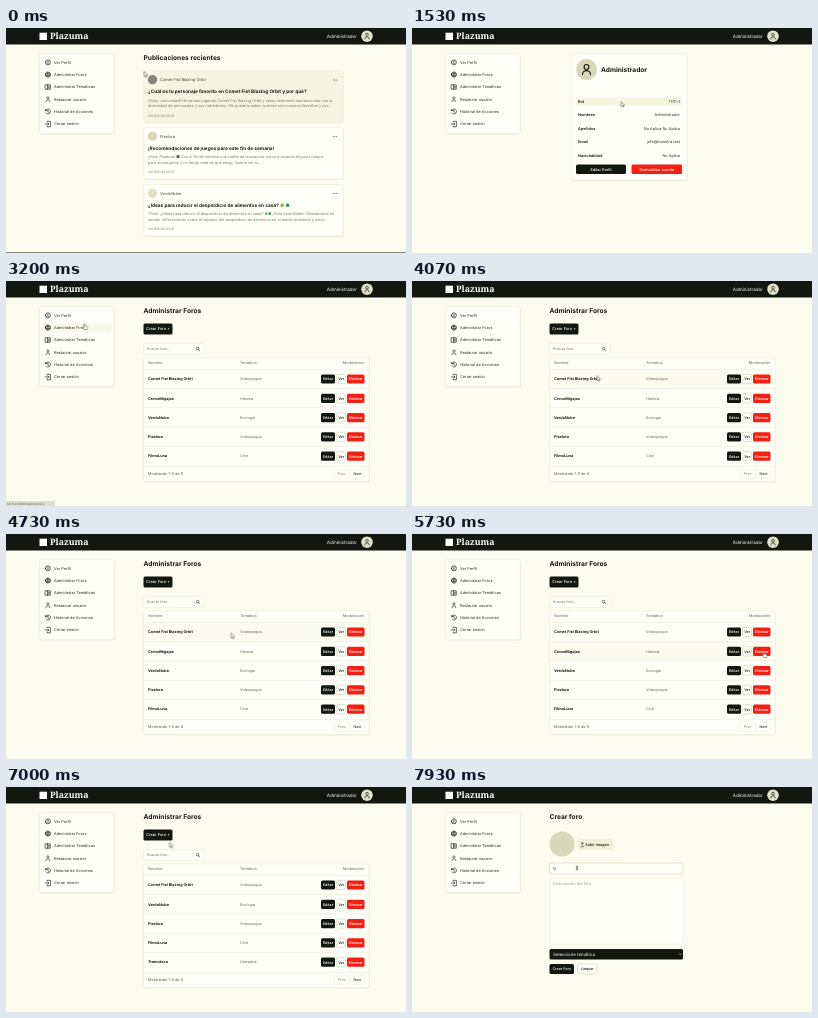
An HTML page for the animation above (8 s loop, 400 by 225 pixels).

```html
<!DOCTYPE html>
<html lang="es">
<head>
<meta charset="utf-8">
<title>Foro</title>
<style>
  html, body { margin: 0; width: 100%; height: 100%; overflow: hidden; background: #fdfdef; }
  svg { display: block; width: 100%; height: 100%; }
  text { font-family: Inter, "Open Sans", sans-serif; white-space: pre; text-rendering: geometricPrecision; }
  .brand { font-family: "Noto Serif", serif; }
</style>
</head>
<body>
<svg id="stage" viewBox="0 0 400 225" preserveAspectRatio="none"></svg>
<script>
const LOOP = 8000;
const INK = '#12170f', TEXT = '#17190f', SOFT = '#7b7b66', LINE = '#e9e9d2';
const PAPER = '#fffffa', PALE = '#f3f3da', HOVER = '#f5f5e1', SAND = '#d9d9b9';
const RED = '#f22012', DEEP_RED = '#bb1a0b';
const stage = document.getElementById('stage');

function add(parent, tag, attrs = {}, content) {
  const el = document.createElementNS('http://www.w3.org/2000/svg', tag);
  for (const key in attrs) el.setAttribute(key, attrs[key]);
  if (content !== undefined) el.textContent = content;
  parent.append(el);
  return el;
}
const group = (parent = stage) => add(parent, 'g');
const rect = (p, x, y, x2, y2, fill, rx = 0, stroke = 'none') =>
  add(p, 'rect', { x, y, width: x2 - x, height: y2 - y, fill, rx, stroke, 'stroke-width': .5 });
const circle = (p, cx, cy, r, fill) => add(p, 'circle', { cx, cy, r, fill });
const path = (p, d, stroke = TEXT, width = .65, fill = 'none') =>
  add(p, 'path', { d, stroke, fill, 'stroke-width': width, 'stroke-linecap': 'round', 'stroke-linejoin': 'round' });
const text = (p, x, y, str, size = 3.8, weight = 400, fill = TEXT, anchor = 'start') =>
  add(p, 'text', { x, y, 'font-size': size, 'font-weight': weight, fill, 'text-anchor': anchor }, str);

// Text whose symbols ◆ ● ○ become small coloured marks.
const MARKS = { '◆': ['■', '#54505c'], '●': ['●', '#7fb62c'], '○': ['●', '#2f9362'] };
function markedText(p, x, y, str, ...style) {
  const el = text(p, x, y, '', ...style);
  for (const part of str.split(/([◆●○])/)) {
    const [content, fill] = MARKS[part] || [part];
    add(el, 'tspan', fill ? { fill } : {}, content);
  }
}

function button(p, x, y, x2, y2, label, fill, color = '#fff', size = 3.5, weight = 500) {
  const pale = fill === PAPER || fill === PALE;
  rect(p, x, y, x2, y2, fill, 1.5, pale ? '#c4c4a0' : 'none');
  text(p, (x + x2) / 2, (y + y2) / 2 + size * .36, label, size, weight, color, 'middle');
}
function panel(p, x, y, x2, y2) {
  rect(p, x + .3, y + .8, x2 + .6, y2 + 1, '#eeeed9', 2);
  return rect(p, x, y, x2, y2, PAPER, 2, LINE);
}
function person(p, x, y, s) {
  add(p, 'circle', { cx: x, cy: y - .25 * s, r: .23 * s, fill: 'none', stroke: TEXT, 'stroke-width': .11 * s });
  path(p, `M${x - .38 * s} ${y + .48 * s}a${.38 * s} ${.38 * s} 0 0 1 ${.76 * s} 0`, TEXT, .11 * s);
}

// Visible only inside the given [from, to] spans.
function show(el, ...spans) {
  const frames = [{ offset: 0, opacity: 0 }];
  for (const [from, to] of spans) {
    if (from === 0) frames[0].opacity = 1;
    else frames.push({ offset: from / LOOP, opacity: 1 });
    if (to < LOOP) frames.push({ offset: to / LOOP, opacity: 0 });
  }
  frames.push({ offset: 1, opacity: frames.at(-1).opacity });
  for (const f of frames) f.easing = 'step-end';
  el.animate(frames, { duration: LOOP, iterations: Infinity });
  return el;
}

function drawHome(p) {
  text(p, 137.5, 32.4, 'Publicaciones recientes', 6.6, 700);
  const posts = [
    { y: 43, color: '#85857c', forum: 'Comet Fist Blazing Orbit',
      title: '¿Cuál es tu personaje favorito en Comet Fist Blazing Orbit y por qué?',
      body: ['¡Hola, comunidad! He estado jugando Comet Fist Blazing Orbit y estoy realmente impresionado con la',
             'diversidad de personajes y sus habilidades. Me gustaría saber quiénes son vuestros favoritos y por...'] },
    { y: 99.5, color: SAND, forum: 'Pixelura',
      title: '¡Recomendaciones de juegos para este fin de semana!',
      body: ['¡Hola, Pixelura! ◆ Con el fin de semana a la vuelta de la esquina, estoy buscando algunos juegos',
             'para sumergirme y no tengo idea de qué elegir. Quería ver si...'] },
    { y: 156.5, color: '#e1e1c2', forum: 'VerdoNube',
      title: '¿Ideas para reducir el desperdicio de alimentos en casa? ● ○',
      body: ['Título: ¿Ideas para reducir el desperdicio de alimentos en casa? ●○ ¡Hola VerdoNube! Últimamente he',
             'estado reflexionando sobre el impacto del desperdicio de alimentos en el medio ambiente y estoy...'] }
  ];
  posts.forEach(({ y, color, forum, title, body }, i) => {
    panel(p, 138, y, 337, y + 51.5);
    if (!i) show(rect(p, 138, y, 337, y + 51.5, HOVER, 2), [0, 140]);
    circle(p, 146.5, y + 8.8, 4.7, color);
    text(p, 154, y + 10.1, forum, 4, 400, '#45452f');
    for (const x of [327.4, 329, 330.6]) circle(p, x, y + 9, .45, TEXT);
    markedText(p, 142, y + 22.2, title, 4.75, 700);
    body.forEach((line, k) => markedText(p, 142, y + 30.8 + k * 5.6, line, 3.85, 400, SOFT));
    text(p, 142, y + 45.5, '03/12/2024 05:21', 3.2, 400, SOFT);
  });
  rect(p, 0, 224, 400, 225, '#898978');
}

function drawProfile(p) {
  panel(p, 160, 25.5, 275, 152);
  circle(p, 174.5, 41.5, 10.5, SAND);
  person(p, 174.5, 41.5, 10.5);
  text(p, 189, 44.2, 'Administrador', 6.6, 700);
  const rows = [['Rut', '11111-1'], ['Nombres', 'Administrador'], ['Apellidos', 'No Aplica No Aplica'],
                ['Email', 'jefe@muestra.test'], ['Nacionalidad', 'No Aplica']];
  const hovers = [[1380, 1800], [1800, 1960], [1960, 2090], [2090, 2220], [2220, 2340]];
  rows.forEach(([label, value], i) => {
    const y = 73.6 + i * 13.5;
    show(rect(p, 163.5, y - 4.5, 270, y + 4.5, HOVER, 1), hovers[i]);
    text(p, 166, y + 1.3, label, 3.85, 600);
    text(p, 268, y + 1.3, value, 3.85, 400, '#303020', 'end');
  });
  button(p, 164, 136.5, 214, 146, 'Editar Perfil', INK, '#fff', 3.8);
  button(p, 219.5, 136.5, 270, 146, 'Deshabilitar cuenta', RED, '#fff', 3.75);
}

function drawForums(p, names, total, hovers) {
  text(p, 137.5, 32.4, 'Administrar Foros', 6.65, 700);
  button(p, 137.5, 42.5, 166.5, 53.5, 'Crear Foro +', INK, '#fff', 4);
  rect(p, 137.5, 62.5, 198, 73.5, PAPER, 1.5, LINE);
  text(p, 141, 69.3, 'Buscar foro...', 3.7, 400, SOFT);
  circle(p, 191.6, 67.6, 1.3, 'none').setAttribute('style', `stroke:${TEXT};stroke-width:.55`);
  path(p, 'M192.6 68.6l1.2 1.2', TEXT, .55);
  panel(p, 137.5, 77, 363, 200.5);
  text(p, 142, 83.4, 'Nombre', 3.8, 500, SOFT);
  text(p, 234, 83.4, 'Temática', 3.8, 500, SOFT);
  text(p, 358.5, 83.4, 'Moderación', 3.8, 500, SOFT, 'end');
  names.forEach(([name, topic], i) => {
    const y = 98 + i * 19.3;
    if (hovers[i]) show(rect(p, 138, y - 9.6, 362.7, y + 9.6, '#fbfbee'), ...hovers[i]);
    rect(p, 137.5, y - 10, 363, y - 9.5, LINE);
    text(p, 142, y + 1.2, name, 3.8, 700);
    text(p, 234, y + 1.2, topic, 3.7, 400, '#65654c');
    button(p, 315, y - 4.6, 329, y + 4.6, 'Editar', INK, '#fff', 3.7);
    button(p, 330.7, y - 4.6, 339.6, y + 4.6, 'Ver', PAPER, TEXT, 3.7);
    button(p, 341, y - 4.6, 358.5, y + 4.6, 'Eliminar', RED, '#fff', 3.7);
  });
  rect(p, 137.5, 185, 363, 185.5, LINE);
  text(p, 142, 194, `Mostrando 1-5 de ${total}`, 3.8, 400, '#58583f');
  rect(p, 328.5, 188, 343, 197.5, PAPER, 1.5, LINE);
  rect(p, 344.5, 188, 358.5, 197.5, PAPER, 1.5, LINE);
  text(p, 335.7, 194, 'Prev', 3.6, 400, SOFT, 'middle');
  text(p, 351.5, 194, 'Next', 3.6, 400, TEXT, 'middle');
}

function drawCreate(p) {
  text(p, 137.5, 32.4, 'Crear foro', 6.65, 700);
  circle(p, 150, 57, 12.6, SAND);
  rect(p, 165.5, 52, 201.5, 63, '#f0f0d6', 1.5);
  path(p, 'M170.3 58.5v-3m-1.2 1.2l1.2-1.2 1.2 1.2m-2.6 3h2.8', TEXT, .5);
  text(p, 173.2, 58.9, 'Subir imagen', 3.8, 500);
  rect(p, 137.5, 76, 271, 87, PAPER, 1.5, '#c4c4a0');
  show(text(p, 141, 83, 'Nombre del foro', 3.9, 400, '#96967c'), [7300, 7870]);
  show(text(p, 141, 83, 'O', 3.9), [7870, LOOP]);
  rect(p, 137.5, 91.5, 271, 157, PAPER, 1.5, LINE);
  text(p, 141, 98, 'Descripción del foro', 4, 400, '#96967c');
  rect(p, 137.5, 162, 271, 172.5, INK, 1.5);
  text(p, 141, 168.7, 'Seleccione temática', 4.4, 400, '#fff');
  path(p, 'M267.2 166.7l1.1 1.1 1.1-1.1', '#fff', .5);
  button(p, 137.5, 177, 162, 187, 'Crear Foro', INK, '#fff', 3.7);
  button(p, 165.5, 177, 185, 187, 'Limpiar', PAPER, TEXT, 3.7);
}

function drawFrame(p) {
  rect(p, 0, 0, 400, 16.5, INK);
  rect(p, 33.5, 4.7, 41, 12, '#fff');
  const brand = text(p, 44, 11.4, 'Plazuma', 8.8, 700, '#fff');
  brand.setAttribute('class', 'brand');
  text(p, 351, 10, 'Administrador', 4.55, 400, '#fff', 'end');
  circle(p, 361, 8.2, 5.8, '#e2e2c8');
  person(p, 361, 8.2, 6);

  panel(p, 33.5, 25.5, 108, 105.5);
  const hovers = { 0: [430, 1000], 1: [2840, 3570] };
  const labels = ['Ver Perfil', 'Administrar Foros', 'Administrar Temáticas',
                  'Restaurar usuario', 'Historial de Acciones', 'Cerrar sesión'];
  labels.forEach((label, i) => {
    const y = 34.3 + i * 12.35;
    if (hovers[i]) show(rect(p, 36, y - 5, 105.5, y + 5, '#fafaec', 1.5), hovers[i]);
    text(p, 48, y + 1.4, label, 3.9, 400, '#292b1d');
  });
  const ring = y => `M39.4 ${y}a2.5 2.5 0 1 0 5 0a2.5 2.5 0 1 0-5 0`;
  path(p, ring(34.3));
  person(p, 41.9, 34.5, 3.6);
  path(p, ring(46.6) + 'M39.6 45.8h4.6M39.6 47.4h4.6M41.9 44.1v5');
  path(p, 'M39.5 56.8h4.8v4.4h-4.8zM41.5 56.8v4.4M42.4 58.3h1M42.4 59.8h1');
  person(p, 41.9, 71.3, 5.2);
  path(p, 'M39.7 82.5a2.5 2.5 0 1 1 .2 2.4M39.3 81.4l.4 1.4 1.4-.4M41.9 82.2v1.6l1.2.6');
  path(p, 'M41 93.8v-.5h3.4v5.5h-3.4v-.6M39.2 96h3.6m-1-1l1 1-1 1');
}

function drawDialog(p) {
  rect(p, 0, 0, 400, 225, 'rgba(0,0,0,.36)');
  rect(p, 141.5, 87.5, 258.5, 137, PAPER, 2);
  text(p, 148, 99, 'Eliminar Foro', 4.9, 700);
  text(p, 148, 108.7, 'Estás a punto de eliminar este foro. Esta acción no se', 3.85, 400, SOFT);
  text(p, 148, 114.3, 'puede deshacer.', 3.85, 400, SOFT);
  button(p, 202, 122, 226.5, 131.5, 'Cancelar', PALE, TEXT, 3.9);
  button(p, 229, 122, 252, 131.5, 'Eliminar', RED, '#fff', 3.8);
  const hot = show(group(p), [6280, 6630]);
  button(hot, 229, 122, 252, 131.5, 'Eliminar', DEEP_RED, '#fff', 3.8);
}

function drawStatus(label, ...spans) {
  const g = show(group(), ...spans);
  rect(g, 0, 220, 49, 225, '#deded0', .8);
  text(g, 1, 223.7, label, 3, 400, '#5d5d50');
}

function drawCursor() {
  const g = group();
  const arrow = 'M0 0v4.6l1.1-1 .8 1.7.8-.4-.8-1.6h1.5z';
  const hand = 'M-.6 0q.6-.6 1.2 0v2l2 .5q.5.2.4.8l-.4 2.2h-2.9l-1.5-2.2q.1-.7.8-.4l.4.4z';
  const beam = 'M-.8-2q.8 0 .8.5v3q0 .5-.8.5M.8-2q-.8 0-.8.5v3q0 .5.8.5';
  show(path(g, arrow, '#222', .4, '#fff'), [0, 430], [1000, 2400], [2680, 2840], [3570, 5500], [5850, 6280], [6640, 7030], [7420, 7720]);
  show(path(g, hand, '#222', .4, '#fff'), [430, 1000], [2400, 2680], [2840, 3570], [5500, 5850], [6280, 6640], [7030, 7420]);
  show(path(g, beam, '#222', .5), [7720, LOOP]);
  const stops = [
    [0, 138, 44], [70, 138, 44], [520, 62, 35], [900, 62, 35], [1180, 110, 56], [1530, 209, 74],
    [1750, 212, 77], [2440, 190, 141], [2600, 190, 141], [2950, 78.5, 43], [3450, 78.5, 43],
    [3900, 170, 84], [4330, 215, 118], [4480, 220, 176], [4730, 225, 99.5], [5070, 232, 101],
    [5570, 352, 118], [5900, 352, 118], [6380, 249, 126], [6650, 249, 126], [7100, 154, 48],
    [7380, 154, 48], [7780, 165, 81], [LOOP, 165, 81]
  ];
  g.animate(stops.map(([t, x, y]) => ({
    offset: t / LOOP, transform: `translate(${x}px, ${y}px)`, easing: 'ease-in-out'
  })), { duration: LOOP, iterations: Infinity });
}

const forums = [['Comet Fist Blazing Orbit', 'Videojuegos'], ['CronoMigajas', 'Historia'],
                ['VerdoNube', 'Ecología'], ['Pixelura', 'Videojuegos'], ['FilmoLuna', 'Cine']];
const remaining = [...forums.filter((_, i) => i !== 1), ['Tramoteca', 'Literatura']];
const rowHovers = [[[4000, 4250], [4640, 5250]], [[4250, 4360], [4590, 4640], [5250, 5850]],
                   [[4360, 4400], [4550, 4590]], [[4400, 4430], [4520, 4550]], [[4430, 4520]]];

drawFrame(group());
drawHome(show(group(), [0, 730]));
drawProfile(show(group(), [730, 3070]));
drawForums(show(group(), [3070, 6670]), forums, 6, rowHovers);
drawForums(show(group(), [6670, 7300]), remaining, 5, []);
drawCreate(show(group(), [7300, LOOP]));
drawDialog(show(group(), [5800, 6670]));
drawStatus('127.0.0.1:8000/perfil', [450, 1000]);
drawStatus('127.0.0.1:8000/perfil/editar', [2400, 2680]);
drawStatus('127.0.0.1:8000/admin/foros', [2840, 3570]);
drawStatus('127.0.0.1:8000/foros/crear', [7030, 7420]);
drawCursor();
</script>
</body>
</html>
```
